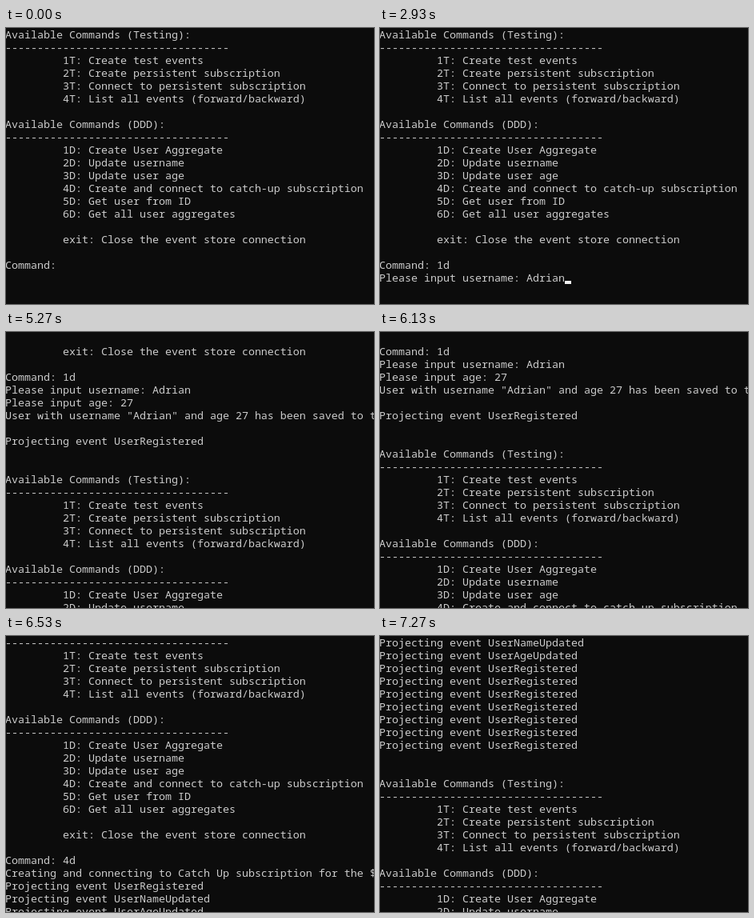
An HTML page for the animation above (8000 ms loop, 460 by 345 pixels).

```html
<!DOCTYPE html>
<html lang="en">
<head>
<meta charset="utf-8">
<title>Console session</title>
<style>
  html, body { margin: 0; width: 100%; height: 100%; overflow: hidden; background: #0c0c0c; }
  #stage { position: relative; width: 100%; height: 100%; overflow: hidden; contain: strict; }
  #screen {
    position: absolute; left: -1px; top: 0; margin: 0;
    color: #ccc; white-space: pre;
    font: 13.3333px/16px "Noto Sans Mono", "DejaVu Sans Mono", monospace;
    font-variant-ligatures: none;
  }
  #cursor { position: absolute; width: 8px; height: 4px; background: #f2f2f2; }
</style>
</head>
<body>
<div id="stage">
  <pre id="screen"></pre>
  <div id="cursor"></div>
</div>
<script>
const LOOP = 8000, ROWS = 30, VISIBLE_ROWS = 22;
const CELL_W = 8, CELL_H = 16, LEFT = -1;
const BLINK = 523, FIRST_BLINK = 670;

const indent = text => ' '.repeat(9) + text;
const rule = '-'.repeat(35);
const projecting = name => 'Projecting event User' + name;

const menu = [
  'Available Commands (Testing):',
  rule,
  ...[
    '1T: Create test events',
    '2T: Create persistent subscription',
    '3T: Connect to persistent subscription',
    '4T: List all events (forward/backward)'
  ].map(indent),
  '',
  'Available Commands (DDD):',
  rule,
  ...[
    '1D: Create User Aggregate',
    '2D: Update username',
    '3D: Update user age',
    '4D: Create and connect to catch-up subscription',
    '5D: Get user from ID',
    '6D: Get all user aggregates',
    '',
    'exit: Close the event store connection'
  ].map(indent),
  '',
  'Command: '
];

// The session is a stream of text chunks, each with the time it appears
const stream = [];

function print(at, ...lines) {
  stream.push({ at, text: lines.join('\n') });
}

// Keystrokes evenly spaced from start to end
function type(text, start, end) {
  [...text].forEach((key, i) => print(start + (end - start) * i / (text.length - 1), key));
}

// Long output arrives in two halves
function burst(at, ...lines) {
  const half = lines.length >> 1;
  print(at, ...lines.slice(0, half), '');
  print(at + 70, ...lines.slice(half));
}

print(0, ...menu);
type('1d', 930, 1330);
print(1800, '', 'Please input username: ');
type('Adrian', 2330, 2930);
print(3400, '', 'Please input age: ');
type('27', 3600, 3870);
print(4600, '', 'User with username "Adrian" and age 27 has been saved to the event store', '');
burst(5200, '', projecting('Registered'), '', '', ...menu);
print(6130, '4d', 'Creating and connecting to Catch Up subscription for the $ce stream', '');
print(6200, projecting('Registered'), '');
print(6530, projecting('NameUpdated'), projecting('AgeUpdated'),
  ...Array(7).fill(projecting('Registered')), '');
burst(7200, '', '', ...menu);

const screen = document.getElementById('screen');
const cursor = document.getElementById('cursor');

// Output lights the cursor; each blink tick after that toggles it
function cursorLit(time, lastOutput) {
  const ticks = t => Math.floor((t - FIRST_BLINK) / BLINK);
  return time >= FIRST_BLINK && (ticks(time) - ticks(lastOutput)) % 2 === 0;
}

function draw(time) {
  const past = stream.filter(chunk => chunk.at <= time);
  const lines = past.map(chunk => chunk.text).join('').split('\n');
  const top = Math.max(0, lines.length - ROWS);
  const text = lines.slice(top, top + VISIBLE_ROWS).join('\n');
  if (screen.textContent !== text) screen.textContent = text;

  cursor.style.left = LEFT + lines.at(-1).length * CELL_W + 'px';
  cursor.style.top = (lines.length - top) * CELL_H - 4 + 'px';
  cursor.style.visibility = cursorLit(time, past.at(-1).at) ? 'visible' : 'hidden';
}

const start = performance.now();

function tick() {
  draw((performance.now() - start) % LOOP);
  requestAnimationFrame(tick);
}
tick();
</script>
</body>
</html>
```
